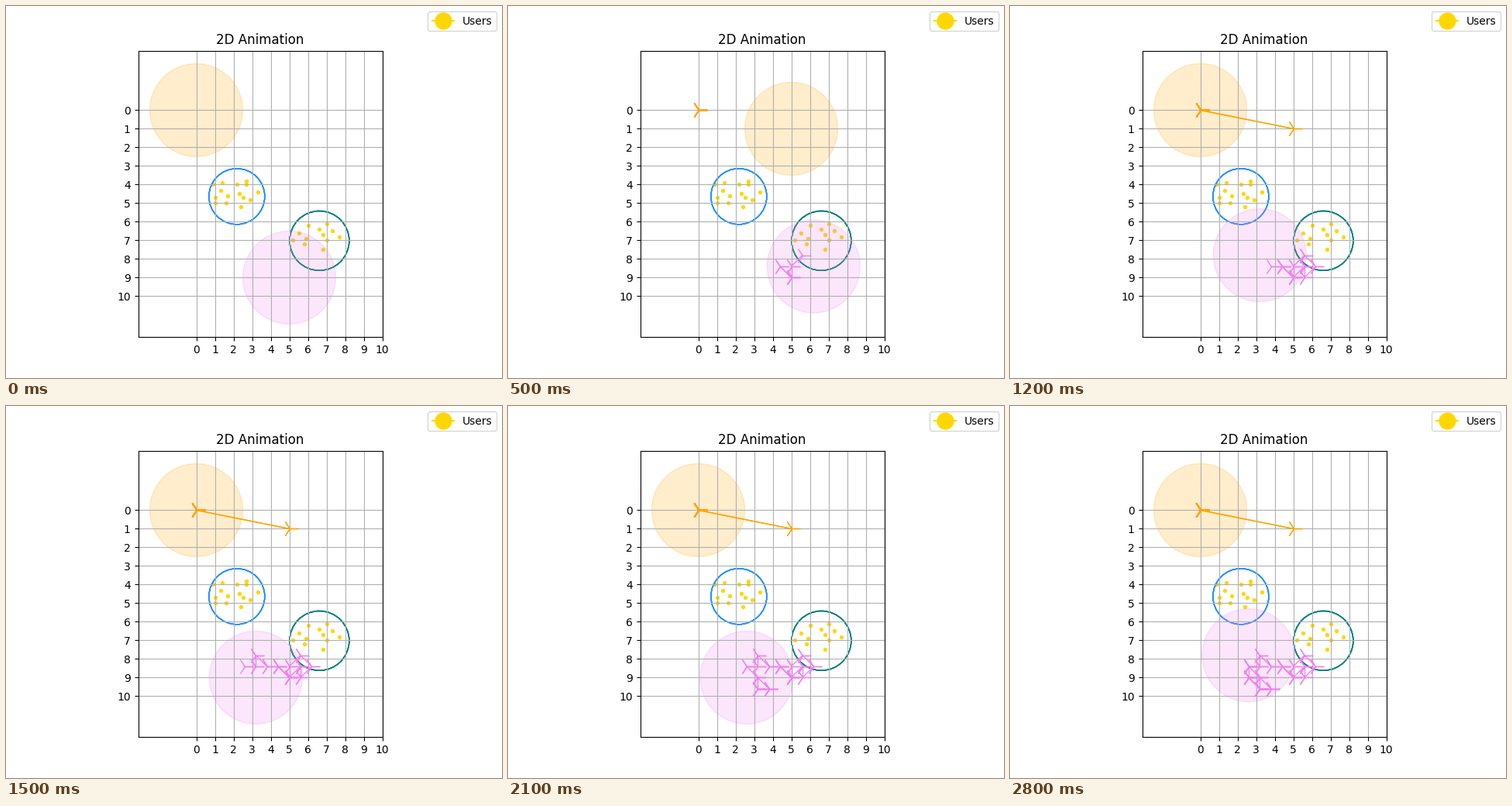
These frames come from a looping animation (640x480 px, 2.9 s). A matplotlib script:

```python
import matplotlib.pyplot as plt
import numpy as np
from matplotlib.animation import FuncAnimation
from matplotlib.lines import Line2D
from matplotlib.patches import Circle

FRAMES = 29
STEP = 0.6
RANGE = 2.5
GOLDEN_ANGLE = np.pi * (3 - np.sqrt(5))
rng = np.random.default_rng(4)


def scatter_users(count, center, spread):
    """Loosely even spots in an ellipse, on a grid of tenths."""
    k = np.arange(count)
    radius = np.sqrt((k + 0.7) / count)
    angle = k * GOLDEN_ANGLE + rng.uniform(-0.3, 0.3, count)
    unit = np.column_stack([np.cos(angle), np.sin(angle)])
    return np.round(center + radius[:, None] * unit * spread, 1)


def walk(stops):
    """Go one cell at a time to each stop, diagonally first; a repeat waits."""
    cells = [np.array(stops[0])]
    for stop in stops[1:]:
        cells.append(cells[-1] + np.sign(stop - cells[-1]))
        while np.any(cells[-1] != stop):
            cells.append(cells[-1] + np.sign(stop - cells[-1]))
    return np.array(cells)


# Violet node: a loop round the hub, then a drift left with some shuttling
home, hub, low, far = (0, 0), (1, -1), (-3, 1), (-4, -1)
loop = [(1 - round(np.cos(a)), -1 - round(np.sin(a)))
        for a in np.arange(4) * np.pi / 2]
stops = [home, (-1, -1), home, *loop, hub, hub, home, (-2, -1), (-3, -2),
         (-3, -1), far, low, *[(-2, 1), low, (-2, 1)],
         *[(-4, 0), low] * 2, far, far, (-4, -2)]
violet_path = np.array([5, 9]) + STEP * walk(stops)

# Orange node: one brief hop and back
orange_path = np.zeros((FRAMES, 2))
orange_path[5] = (5, 1)

fig, ax = plt.subplots(figsize=(6.4, 4.8), dpi=100)
# A hair to the right, so that edges on half pixels round up
fig.subplots_adjust(left=0.12501, right=0.90001)
ax.set_aspect("equal")
ax.set_xticks(range(11))
ax.set_yticks(range(11))
ax.set_xlim(-3.125, 10)
ax.set_ylim(12.2, -3.2)
ax.grid(True)
ax.set_title("2D Animation")


def add_cluster(center, radius, color, users):
    ax.scatter(*users.T, s=8, color="gold", zorder=1)
    # Overlaid outlines give a firm edge
    for _ in range(4):
        ax.add_patch(Circle(center, radius, fill=False, edgecolor=color))


add_cluster((2.18, 4.64), 1.5, "dodgerblue",
            scatter_users(15, (2.0, 4.4), (1.35, 0.95)))
add_cluster((6.62, 7.02), 1.6, "teal",
            scatter_users(12, (6.4, 6.75), (1.5, 0.75)))


def add_node(path, color):
    disc = ax.add_patch(Circle(path[0], RANGE, color=color, alpha=0.2))
    legs = [ax.plot(*path[max(k - 1, 0):k + 1].T, color=color, marker="4",
                    markersize=16, linewidth=1)[0]
            for k in range(FRAMES - 1)]
    return path, disc, legs


nodes = [add_node(orange_path, "orange"), add_node(violet_path, "violet")]
ax.set_xlim(-3.125, 10)
ax.set_ylim(12.2, -3.2)

handle = Line2D([0], [0], color="gold", marker="o", markersize=15,
                label="Users")
fig.legend(handles=[handle], loc="upper right")


def update(n):
    for path, disc, legs in nodes:
        disc.center = path[n]
        for k, leg in enumerate(legs):
            leg.set_visible(k < n)
    return [artist for _, disc, legs in nodes for artist in (disc, *legs)]


anim = FuncAnimation(fig, update, frames=FRAMES, interval=100, repeat=True,
                     repeat_delay=0)
plt.show()
```
